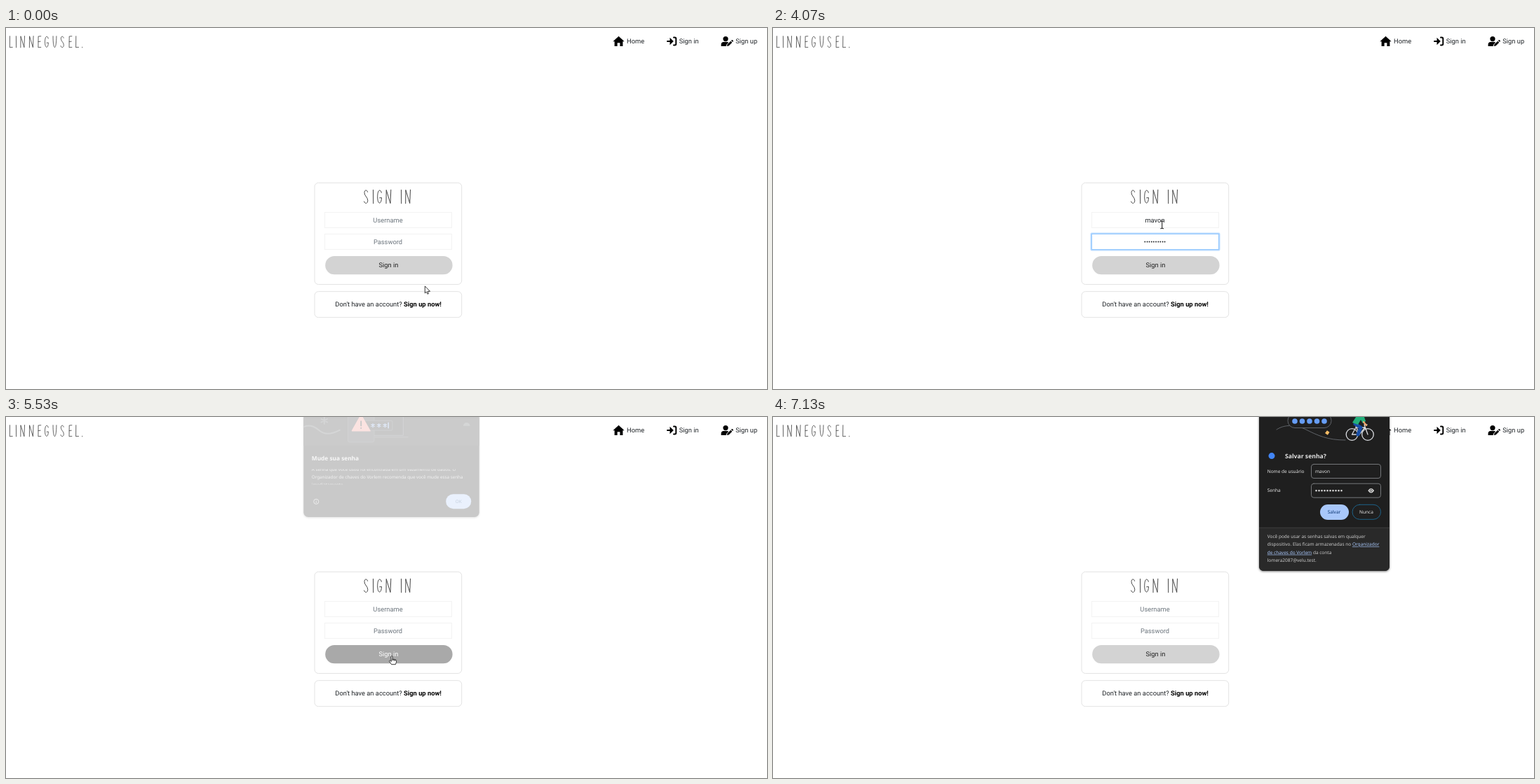
Write an HTML page that moves like this. It is 1085x516 px and loops after 7800 ms.

```html
<!DOCTYPE html>
<html lang="en">
<head>
<meta charset="utf-8">
<title>Sign in</title>
<style>
  html, body { margin: 0; width: 100%; height: 100%; overflow: hidden; background: #fff; }
  svg { display: block; }
  text { font: 9.33px Roboto, sans-serif; fill: #212529; text-rendering: geometricPrecision; white-space: pre; }
  .mid { text-anchor: middle; }
  .bold { font-weight: 700; fill: #000; }
  .line { fill: none; stroke-linecap: round; stroke-linejoin: round; }
  .card { fill: #fff; stroke: #e3e3e3; }
  .field { fill: #fff; stroke: #f3f3f3; }
  .ring { fill: none; stroke: #007bff; }
  .dark text { font: 6.53px "Noto Sans", "Open Sans", sans-serif; fill: #e3e3e3; }
  .dark .title { font-size: 8.65px; font-weight: 600; }
  .dark .strong { font-weight: 500; }
  .dark .navy { fill: #0b3672; }
  .dark .soft { fill: #c9c9c9; }
  .dark .link { fill: #a8c7fa; text-decoration: underline; }
  .popup { filter: drop-shadow(0 1px 1.5px rgba(0, 0, 0, .5)); }
</style>
</head>
<body>
<svg width="1085" height="516" viewBox="0 0 1085 516">
  <g id="lettering" class="line" stroke="#3c3c3c"></g>

  <g id="nav">
    <path d="M873.5 11.8 881.6 19.3H879.4V26H875.4V21.2H871.6V26H867.6V19.3H865.4Z"/>
    <path class="line" stroke="#000" stroke-width="2" d="M952 13.5H953.5Q955.3 13.5 955.3 15.2V22.8Q955.3 24.5 953.5 24.5H952M943 19H949"/>
    <path d="M946.5 13.8 951.8 19 946.5 24.2Z"/>
    <circle cx="1026" cy="15.6" r="3.6"/>
    <path d="M1019.6 26V23.4Q1019.8 20.2 1023 20H1028.6L1030.2 20.7 1027.4 23.4 1026.8 26Z"/>
    <path d="M1028.4 23.4 1033.2 18.7 1035.3 20.8 1030.5 25.5 1028 26ZM1033.9 18 1034.8 17.2Q1035.4 16.8 1036 17.3L1036.7 18Q1037.2 18.6 1036.7 19.3L1036 20.1Z"/>
    <text x="885" y="22">Home</text>
    <text x="959.7" y="22">Sign in</text>
    <text x="1040.3" y="22">Sign up</text>
  </g>

  <g id="form">
    <rect class="card" x="440" y="221.3" width="209.7" height="145.2" rx="5.5"/>
    <rect class="card" x="440" y="376.7" width="209.7" height="37" rx="5.5"/>
    <g id="heading" class="line" stroke="#3c3c3c"></g>
    <rect class="field" x="454.5" y="263.5" width="181" height="22"/>
    <rect class="field" x="454.5" y="294.5" width="181" height="22"/>
    <g id="userRing" class="ring">
      <rect x="453.5" y="262.5" width="183" height="24" rx="1" stroke-width="2" opacity=".28"/>
      <rect x="454.5" y="263.5" width="181" height="22" stroke="#93c7fd"/>
    </g>
    <g id="passRing" class="ring">
      <rect x="453.5" y="293.5" width="183" height="24" rx="1" stroke-width="2" opacity=".28"/>
      <rect x="454.5" y="294.5" width="181" height="22" stroke="#93c7fd"/>
    </g>
    <text id="user" class="mid" x="544.5" y="278"></text>
    <text id="pass" class="mid" x="544.5" y="309.3"></text>
    <rect id="caret" width=".8" height="11" fill="#333"/>
    <rect id="button" x="455.2" y="326" width="181.4" height="26.3" rx="13.1"/>
    <rect id="buttonRing" x="454.4" y="325.1" width="183" height="28.1" rx="14" fill="none" stroke="#88c1f8" stroke-width="2"/>
    <text id="label" class="mid" x="545.4" y="342.2">Sign in</text>
    <text x="469.3" y="398.3">Don't have an account? <tspan class="bold">Sign up now!</tspan></text>
  </g>

  <g id="list" class="dark popup">
    <path d="M517.5 292 522.5 286.5 527.5 292Z" fill="#1f1f1f"/>
    <rect id="listBox" x="511" y="291" rx="3.5" fill="#1f1f1f"/>
  </g>

  <g id="save" class="dark">
    <g class="popup">
      <rect x="693" y="-10" width="186" height="230" rx="7" fill="#1f1f1f"/>
      <path d="M693 158H879V213Q879 220 872 220H700Q693 220 693 213Z" fill="#292929"/>
    </g>
    <path d="M693 158.3H879" stroke="#3c3c3c"/>
    <g class="line">
      <path d="M718 18C728 11 744 10 760 18S790 33 816 33" stroke="#5f6368"/>
      <rect x="734" y="-5" width="62" height="20.5" rx="10" fill="#1f1f1f" stroke="#5f6368"/>
      <path d="M744 6H787" stroke="#669df6" stroke-width="7.6" stroke-dasharray="0 10.5"/>
      <path d="M790 19.2 793.5 21.8 790.8 25.8 787 23Z" fill="#f9bd66"/>
      <g stroke="#dadce0" stroke-width="1.3">
        <circle cx="825.5" cy="25" r="8.3"/><circle cx="848" cy="25" r="8.3"/>
        <path d="M825.5 25 831 15H844L836 25H825.5M836 25 831 13M848 25 843 11H847"/>
      </g>
      <path d="M830 10 838 15 834 25" stroke="#174ea6" stroke-width="5"/>
      <path d="M826 8 833 -3H842L845 6 841 9 838 4 834 11Z" fill="#24b07b"/>
      <path d="M842 7 846 12" stroke="#f6a76b" stroke-width="2.2"/>
    </g>
    <circle cx="711" cy="55.6" r="4.5" fill="#4285f4"/>
    <text class="title" x="730" y="59">Salvar senha?</text>
    <text x="704.7" y="79.7">Nome de usuário</text>
    <text x="704.7" y="107.4">Senha</text>
    <g class="line" stroke="#75777a">
      <rect x="767.5" y="67.5" width="99" height="20" rx="3.5"/>
      <rect x="767.5" y="95.2" width="99" height="20" rx="3.5"/>
      <rect x="826" y="125.3" width="40.5" height="21" rx="10.5" stroke="#1d6288"/>
    </g>
    <text x="773" y="79.7">mavon</text>
    <path class="line" d="M774.5 105.2H811" stroke="#e3e3e3" stroke-width="2.5" stroke-dasharray="0 4"/>
    <path d="M848.3 105.2Q852.7 98.6 857.1 105.2 852.7 111.8 848.3 105.2Z" fill="#ddd"/>
    <circle cx="852.7" cy="105.2" r="1.6" fill="#ddd" stroke="#1f1f1f" stroke-width=".8"/>
    <rect x="780" y="125" width="41" height="22" rx="11" fill="#a8c7fa"/>
    <text class="mid strong navy" x="800" y="138.3">Salvar</text>
    <text class="mid strong" x="846" y="138.3">Nunca</text>
    <text class="soft" x="704.7" y="172.7">Você pode usar as senhas salvas em qualquer</text>
    <text class="soft" x="704.7" y="184.2">dispositivo. Elas ficam armazenadas no <tspan class="link">Organizador</tspan></text>
    <text class="soft" x="704.7" y="195.7"><tspan class="link">de chaves do Vorlem</tspan> da conta</text>
    <text class="soft" x="704.7" y="207.2">lomera2087@velu.test.</text>
  </g>

  <g id="warn" class="dark">
    <rect class="popup" x="419.3" y="-26" width="260.4" height="172.3" rx="7" fill="#1f1f1f"/>
    <path d="M419.3 0H679.7V40H419.3Z" fill="#272727"/>
    <g class="line" stroke="#505357">
      <path d="M420 12C430 8 437 13 443 18S458 25 473 17" stroke-width="2"/>
      <path d="M450 -3V8M445.5 .5 454.5 5.5M454.5 .5 445.5 5.5" stroke-width="1.8"/>
      <path d="M518 -5H567V25H520ZM525 27.5H574" fill="#1f1f1f"/>
      <rect x="485" y="-10" width="39" height="45" rx="3" fill="#2f3033" stroke="#44474a"/>
      <rect x="508" y="3" width="43" height="14.5" rx="2" fill="#1f1f1f" stroke="#44474a"/>
      <path d="M545 6V14" stroke="#8ab4f8" stroke-width="1.4"/>
      <path d="M504.5 -5 517.5 18H491.5Z" fill="#f28b82" stroke="#f28b82" stroke-width="2"/>
      <path d="M504.5 4V10.5M504.5 14V14.2" stroke="#1f1f1f" stroke-width="2"/>
    </g>
    <g id="stars" class="line" stroke="#8ab4f8" stroke-width="1.2"></g>
    <path d="M656 11A5 5 0 0 1 666 11Z" fill="#505357"/>
    <text class="title" x="431.3" y="62">Mude sua senha</text>
    <clipPath id="view"><path d="M425 75H675V98H425Z"/></clipPath>
    <g clip-path="url(#view)">
      <text class="soft" x="431.3" y="77.6">A senha que você usou foi encontrada em um vazamento de dados. O</text>
      <text class="soft" x="431.3" y="89.1">Organizador de chaves do Vorlem recomenda que você mude essa senha</text>
      <text class="soft" x="431.3" y="100.6">imediatamente.</text>
    </g>
    <circle cx="438" cy="123.3" r="3.7" fill="none" stroke="#ddd" stroke-width=".8"/>
    <path d="M438 122.8V125.3M438 121V121.7" stroke="#ddd" stroke-width=".9"/>
    <rect x="630.3" y="112.2" width="37.5" height="21.8" rx="10.9" fill="#a8c7fa"/>
    <text class="mid strong navy" x="649" y="125.6">OK</text>
  </g>

  <g id="cursor" class="line" stroke="#222" stroke-width=".9">
    <path id="arrow" fill="#fff" d="M.3 .3V10L2.5 8 4 11.3 5.5 10.6 4.1 7.4H7.2Z"/>
    <path id="beam" stroke-width="1.1" d="M-1.8 -4.8Q0 -4.8 0 -4 0 -4.8 1.8 -4.8M0 -4V5M-1.8 5.8Q0 5.8 0 5 0 5.8 1.8 5.8"/>
    <path id="hand" fill="#fff" d="M-1 1.2Q0 -.3 1 1.2V5.4Q2 4.6 2.9 5.6 3.9 5 4.6 6 6.4 5.6 6.5 7.3V9.4L5.4 12.7H-.4L-3.3 8.6Q-4 7.2 -2.6 7L-1 8.2ZM1 5.4V7M2.9 5.6V7.2M4.6 6V7.4"/>
  </g>
</svg>
<script>
const LOOP = 7800;
const NS = 'http://www.w3.org/2000/svg';
const el = id => document.getElementById(id);
const set = (id, attrs) => { for (const k in attrs) el(id).setAttribute(k, attrs[k]); };
const show = (id, on) => { el(id).style.display = on ? '' : 'none'; };
const ramp = (t, start, length) => Math.min(1, Math.max(0, (t - start) / length));
const count = (keys, t) => keys.filter(k => k <= t).length;
function add(parent, tag, attrs) {
  const node = document.createElementNS(NS, tag);
  for (const k in attrs) node.setAttribute(k, attrs[k]);
  return el(parent).appendChild(node);
}

// Thin hand-lettered capitals: [advance, path in a 20-unit tall cell]
const GLYPHS = {
  S: [12.5, 'M5.6 3.4C4.4 -.6 1 .4 1 4.6 1 9 5.8 11 5.8 15.6 5.6 20.6 1.6 20.6 .6 17'],
  I: [6.2, 'M1 .5 1.2 19.8'],
  G: [12.3, 'M6.6 4.4C5.6 -1 1.2 -.6 1 9.6 .8 22 6.4 22 6.8 11.6L4 11.8'],
  N: [13.5, 'M1 19.8 1.2 .5 7 19.6 7.8 .3'],
  L: [9.4, 'M1.2 .5 1 19.7 5.6 19.3'],
  E: [10, 'M5.6 .5 1.2 .8 1 19.7 5.6 19.3M1.2 9.8 4.8 9.4'],
  U: [12, 'M1 .5C.8 26 6.8 26 6.8 .5'],
  '.': [4, 'M1 19V19.8'],
  ' ': [8, '']
};
function letter(parent, word, x, y, scale, gap) {
  el(parent).setAttribute('aria-label', word);
  for (const c of word) {
    const [advance, d] = GLYPHS[c];
    add(parent, 'path', { d, 'stroke-width': .95, transform: `translate(${x} ${y}) scale(${scale})` });
    x += advance * scale + gap;
  }
}
letter('lettering', 'LINNEGUSEL.', 4.5, 11.3, .84, 1.2);
letter('heading', 'SIGN IN', 510, 231, 1, 0);

for (const x of [522, 531, 540])
  add('stars', 'path', { d: `M${x} 7.5V13M${x - 2.4} 8.8l4.8 2.8M${x + 2.4} 8.8l-4.8 2.8` });

const rows = ['mavon', 'mavon12345', 'mavonteles', 'mv2087@velu.test', 'lomera', 'lomera2087'].map((name, i) => {
  const row = add('list', 'text', { x: 517.3, y: 306 + i * 20.9, class: 'title', style: 'font-size: 7px' });
  row.textContent = name;
  return row;
});

const userKeys = [1000, 1130, 1200, 1400, 1470];
const passKeys = [1870, 1930, 2070, 2130, 2270, 2930, 3070, 3200, 3400, 3530];
const FOCUS = 530, TAB = 1670, CLICK = 4540, LEAVE = 5130, RETURN = 5270;
const lists = [[0, 0, 0], [660, 6, 132], [1000, 4, 146], [1200, 2, 90], [TAB, 0, 0]];
const route = [
  [0, 597, 369], [530, 555, 277], [4000, 555, 277], [4470, 550, 341],
  [5800, 550, 341], [6200, 378.5, 397.5], [6400, 378.5, 397.5], [6870, 60, 530], [LOOP, 60, 530]
];

function pointer(t) {
  const i = route.findIndex(p => p[0] > t);
  const [t0, x0, y0] = route[i - 1], [t1, x1, y1] = route[i];
  const p = ramp(t, t0, t1 - t0), e = p * p * (3 - 2 * p);
  return [x0 + (x1 - x0) * e, y0 + (y1 - y0) * e];
}

function popup(id, amount, cx, cy) {
  show(id, amount > 0);
  const s = .95 + .05 * amount;
  set(id, { opacity: amount, transform: `translate(${cx} ${cy}) scale(${s}) translate(${-cx} ${-cy})` });
}

function fillField(id, value, hint, focused) {
  el(id).textContent = value || hint;
  el(id).style.fill = !value ? '#6c757d' : focused ? '#495057' : '#212529';
}

function draw(t) {
  const away = t >= LEAVE && t < RETURN;
  show('nav', !away);
  show('form', !away);

  const cleared = t >= LEAVE;
  const inUser = t >= FOCUS && t < TAB, inPass = t >= TAB && t < CLICK;
  const name = cleared ? '' : 'mavon'.slice(0, count(userKeys, t));
  const dots = cleared ? '' : '•'.repeat(count(passKeys, t));
  fillField('user', name, 'Username', inUser);
  fillField('pass', dots, 'Password', false);
  set('userRing', { opacity: ramp(t, FOCUS, 150) - ramp(t, TAB, 150) });
  set('passRing', { opacity: ramp(t, TAB, 150) - ramp(t, CLICK, 120) });

  const lastKey = Math.max(...[0, FOCUS, TAB, ...userKeys, ...passKeys].filter(k => k <= t));
  show('caret', (inUser || inPass) && (t - lastKey) % 1060 < 530);
  const width = inUser ? (name && el('user').getComputedTextLength()) : (dots && el('pass').getComputedTextLength());
  set('caret', { x: 544.6 + width / 2, y: inUser ? 269 : 300.3 });

  const hover = ramp(t, 140, 150) - ramp(t, 260, 150) + ramp(t, 4330, 150)
    - (cleared ? 1 : 0) + ramp(t, RETURN, 240) - ramp(t, 6470, 150);
  const grey = Math.round(211 - 42 * hover), ink = Math.round(33 + 222 * hover);
  set('button', { fill: `rgb(${grey},${grey},${grey})` });
  el('label').style.fill = `rgb(${ink},${ink},${ink})`;
  set('buttonRing', { opacity: cleared ? 0 : ramp(t, CLICK, 120) });

  const [, size, wide] = lists.filter(l => l[0] <= t).pop();
  show('list', size);
  set('listBox', { width: wide, height: 4 + size * 21 });
  rows.forEach((row, i) => { row.style.display = i < size ? '' : 'none'; });

  popup('save', t < 5530 ? ramp(t, RETURN, 240) : ramp(t, 6880, 240), 786, 105);
  popup('warn', ramp(t, 5490, 170) - ramp(t, 6400, 200), 549.5, 60);

  const [x, y] = pointer(t);
  const inside = (top, bottom) => x > 454 && x < 637 && y >= top && y <= bottom;
  const frozen = t >= 5800 && t < 6470;
  const kind = frozen || inside(326, 352) ? 'hand' : inside(263, 286) || inside(294, 317) ? 'beam' : 'arrow';
  for (const k of ['arrow', 'beam', 'hand']) show(k, k === kind);
  set('cursor', { transform: `translate(${x} ${y})` });
}

// Time advances in 15 steps per second.
const start = performance.now();
function tick() {
  const t = (performance.now() - start) % LOOP;
  draw(Math.round(Math.floor((t + 4) * .015) / .15) * 10);
  requestAnimationFrame(tick);
}
tick();
</script>
</body>
</html>
```
